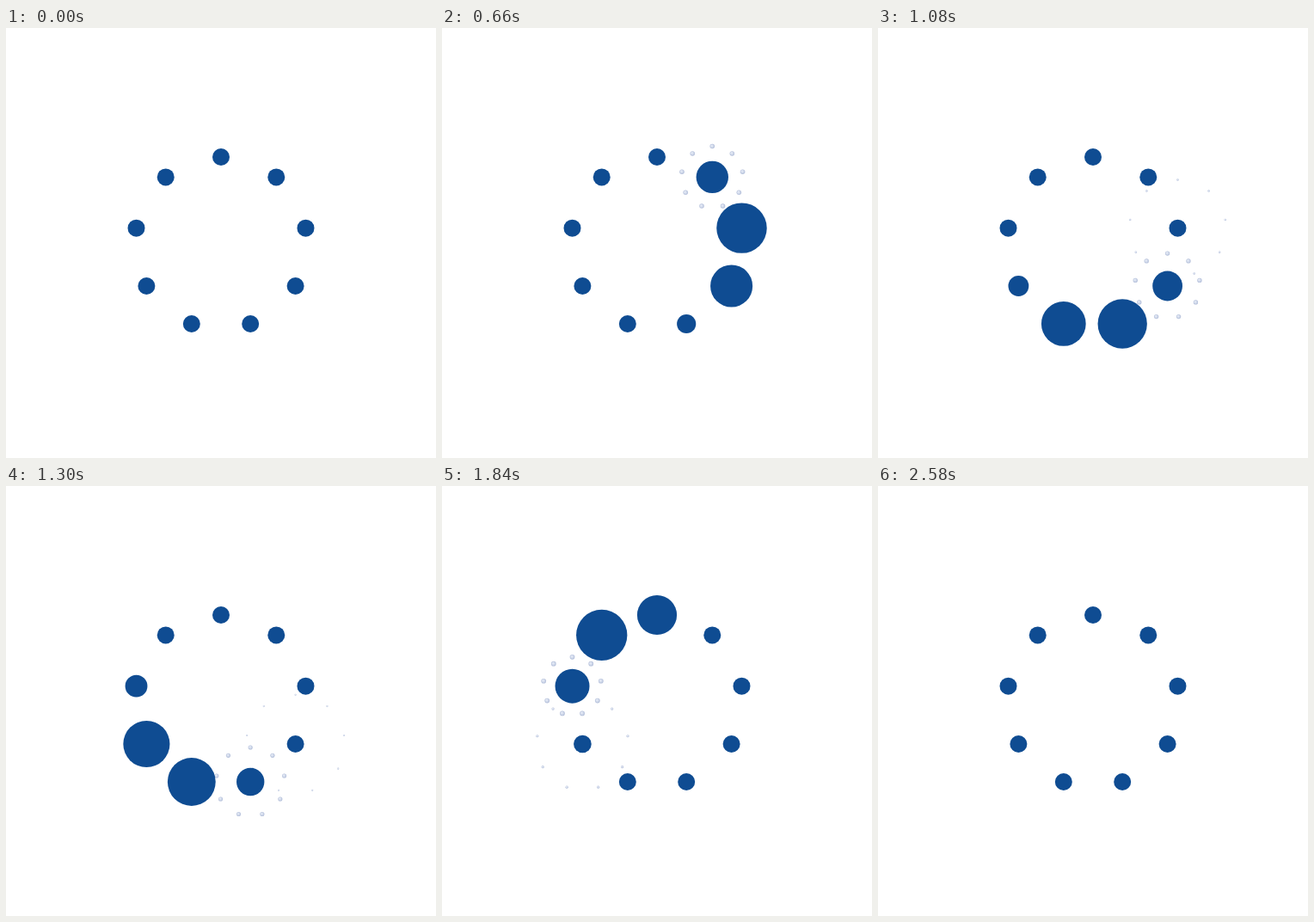
Write an HTML page with a canvas that moves like this. It is 500 px wide and 500 px high and loops after 2.6 s.

```html
<!DOCTYPE html>
<html lang="en">
<head>
<meta charset="utf-8">
<title>Loader</title>
<style>
  html, body { margin: 0; width: 100%; height: 100%; overflow: hidden; background: #fff; }
  canvas { display: block; }
</style>
</head>
<body>
<canvas id="stage" width="500" height="500"></canvas>
<script>
const ctx = document.getElementById('stage').getContext('2d');
const LOOP = 2600, STEP = 20, STAGGER = 200;
const GROW = 400, SHRINK = 480, BURST = 600;
const COUNT = 9, BLUE = '#0f4c92';

const clamp = x => Math.min(1, Math.max(0, x));
const easeSine = x => (1 - Math.cos(Math.PI * clamp(x))) / 2;

// Point at place i of a nine-part ring, clockwise from the top.
function onRing(cx, cy, radius, i) {
  const a = i * 2 * Math.PI / COUNT;
  return [cx + radius * Math.sin(a), cy - radius * Math.cos(a)];
}

function disc(x, y, r, fill) {
  ctx.fillStyle = fill;
  ctx.beginPath();
  ctx.arc(x, y, r, 0, 2 * Math.PI);
  ctx.fill();
}

function bead(x, y, r) {
  const shade = ctx.createRadialGradient(x - r * 0.3, y - r * 0.3, 0, x, y, r);
  shade.addColorStop(0, '#e8edf8');
  shade.addColorStop(0.5, '#d5dded');
  shade.addColorStop(1, '#b0bcd8');
  disc(x, y, r, shade);
}

function drawBurst(cx, cy, age) {
  const p = (age - GROW) / BURST;
  const r = 3.4 * (1 - p * p);
  if (p < 0 || r < 0.3) return;
  for (let i = 0; i < COUNT; i++) {
    bead(...onRing(cx, cy, 20 + 40 * easeSine(p), i), r);
  }
}

function dotRadius(age) {
  const size = age < GROW ? easeSine(age / GROW) : 1 - easeSine((age - GROW) / SHRINK);
  return 10 + 20 * size;
}

function draw(t) {
  ctx.fillStyle = '#fff';
  ctx.fillRect(0, 0, 500, 500);
  const dots = Array.from({ length: COUNT }, (_, i) => ({
    pos: onRing(250, 250, 100, i + 1),
    age: t - i * STAGGER
  }));
  dots.forEach(({ pos, age }) => drawBurst(...pos, age));
  dots.forEach(({ pos, age }) => disc(...pos, dotRadius(age), BLUE));
}

const start = performance.now();
function frame() {
  const t = (performance.now() - start) % LOOP;
  draw(Math.floor(t / STEP) * STEP);
  requestAnimationFrame(frame);
}
frame();
</script>
</body>
</html>
```
